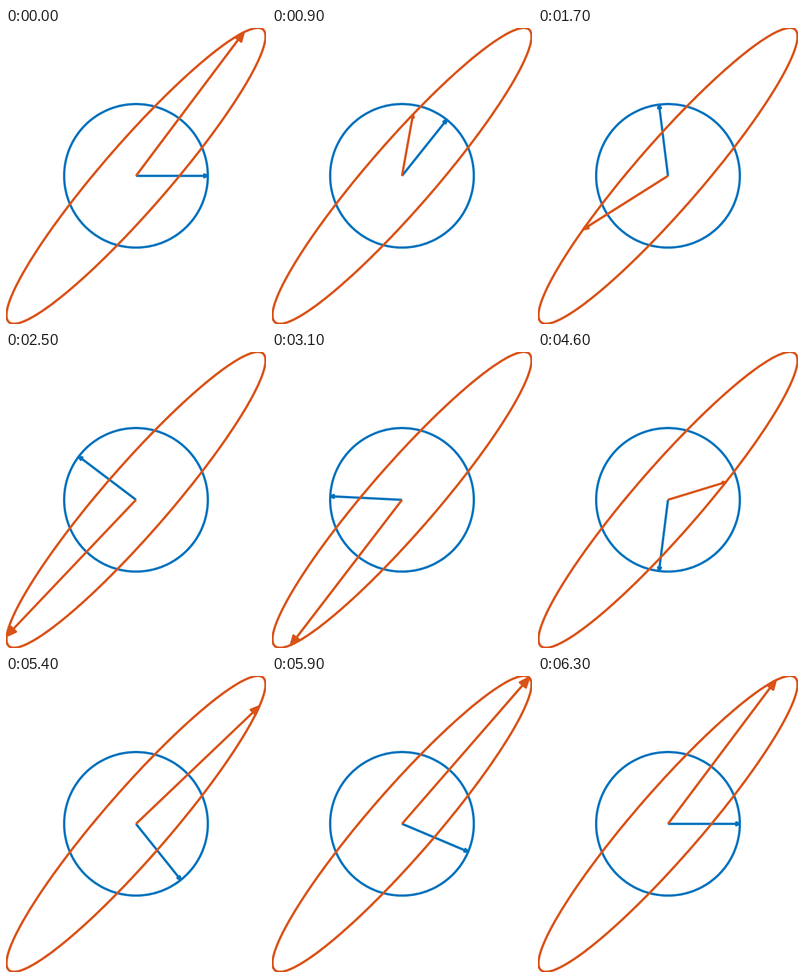
Write an HTML page with a canvas that moves like this. It is 451 px wide and 514 px high and loops after 6400 ms.

```html
<!DOCTYPE html>
<html lang="en">
<head>
<meta charset="utf-8">
<title>Linear map of the unit circle</title>
<style>
html, body { margin: 0; width: 100%; height: 100%; overflow: hidden; background: #fff; }
canvas { display: block; }
</style>
</head>
<body>
<canvas id="stage" width="451" height="514"></canvas>
<script>
const ctx = document.getElementById('stage').getContext('2d');
const BLUE = '#0072bd', ORANGE = '#d95319';
const CX = 225.5, CY = 256.7, UNIT = 124.6;
const STEP_MS = 100, STEPS = 64;

const onCircle = a => [Math.cos(a), Math.sin(a)];
const mapped = a => {
  const [x, y] = onCircle(a);
  return [1.5 * x - y, 2 * x - 0.5 * y];
};
const toStage = ([x, y]) => [CX + UNIT * x, CY - UNIT * y];

function curve(point, color) {
  ctx.strokeStyle = color;
  ctx.beginPath();
  for (let i = 0; i < 360; i++) ctx.lineTo(...toStage(point(i * Math.PI / 180)));
  ctx.closePath();
  ctx.stroke();
}

// The head grows with the length of the vector.
function arrow(vector, color) {
  const [x, y] = toStage(vector);
  const dx = x - CX, dy = y - CY;
  const bx = x - 0.05 * dx, by = y - 0.05 * dy;
  const nx = -0.02 * dy, ny = 0.02 * dx;
  ctx.strokeStyle = ctx.fillStyle = color;
  ctx.beginPath();
  ctx.moveTo(CX, CY);
  ctx.lineTo(x, y);
  ctx.stroke();
  ctx.beginPath();
  ctx.moveTo(x, y);
  ctx.lineTo(bx + nx, by + ny);
  ctx.lineTo(bx - nx, by - ny);
  ctx.closePath();
  ctx.fill();
  ctx.stroke();
}

function draw(now) {
  const step = Math.floor(now / STEP_MS) % STEPS;
  const angle = 2 * Math.PI * step / (STEPS - 1);
  ctx.clearRect(0, 0, 451, 514);
  ctx.lineWidth = 4;
  ctx.lineJoin = 'round';
  curve(onCircle, BLUE);
  arrow(onCircle(angle), BLUE);
  curve(mapped, ORANGE);
  arrow(mapped(angle), ORANGE);
  requestAnimationFrame(draw);
}
requestAnimationFrame(draw);
</script>
</body>
</html>
```
